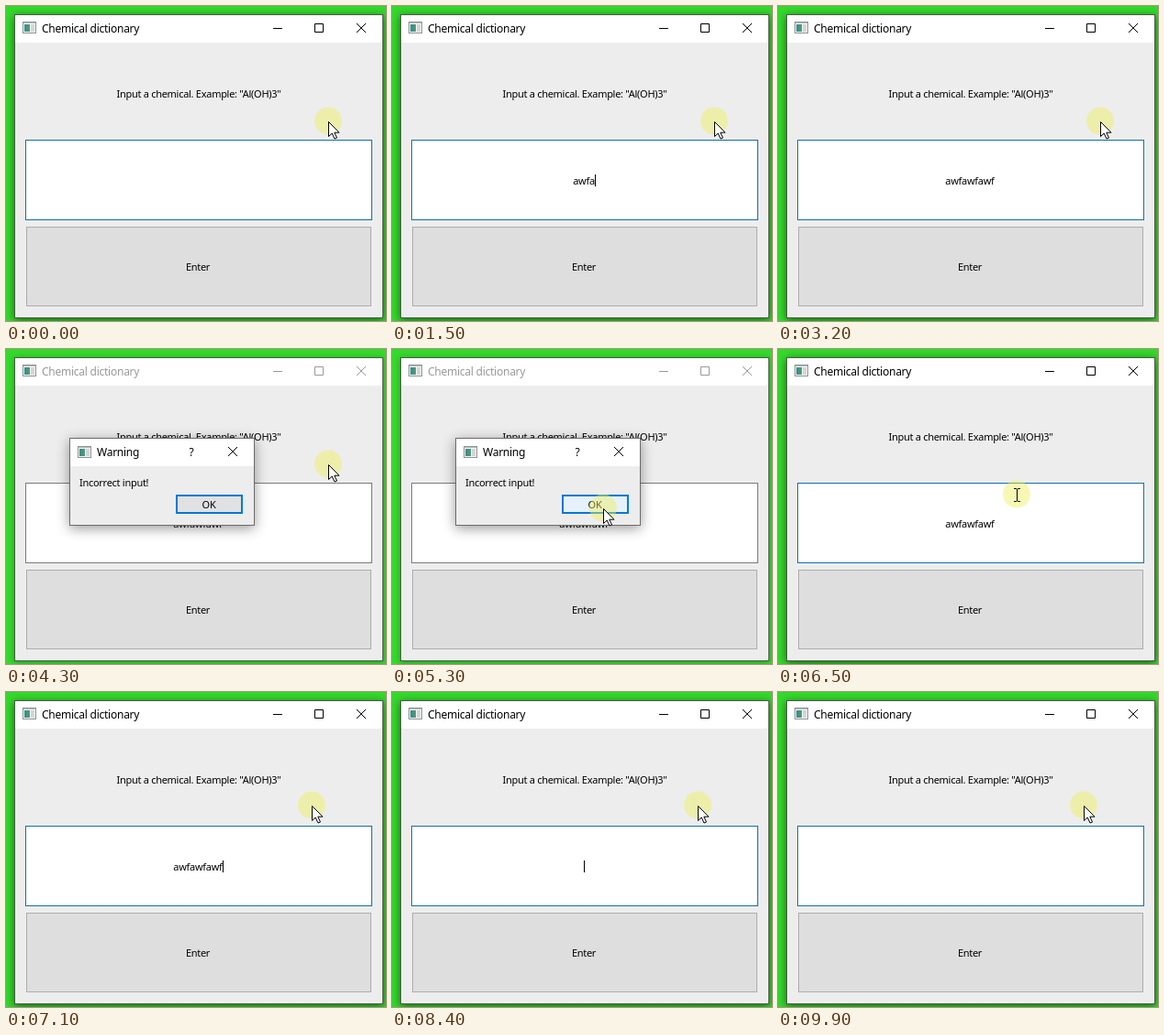
These frames come from a looping animation (414x344 px, 10000 ms). An HTML page:

```html
<!DOCTYPE html>
<html lang="en">
<head>
<meta charset="utf-8">
<title>Chemical dictionary</title>
<style>
  html, body { margin: 0; width: 100%; height: 100%; overflow: hidden; background: #35d92c; }
  svg { display: block; }
  text { font: 11px "Noto Sans", "Open Sans", sans-serif; letter-spacing: -.28px; fill: #000; white-space: pre; }
  .title { font-size: 12px; letter-spacing: -.25px; }
  .mid { text-anchor: middle; }
  .line { fill: none; stroke: currentColor; }
  #frame { filter: drop-shadow(0 2px 5px rgba(0, 0, 0, .55)); }
  #dialog { transform-origin: 170px 145px; }
  #dialogBox { filter: drop-shadow(0 3px 7px rgba(0, 0, 0, .4)); }
  .inactive #frame { filter: drop-shadow(0 1px 3px rgba(0, 0, 0, .3)); }
  .inactive #bar { color: #999; }
  .inactive #bar text { fill: #999; }
  #field { fill: #fff; stroke: #146ea8; }
  .inactive #field { stroke: #7a7a7a; }
  #ok { fill: #e1e1e1; stroke: #0078d7; stroke-width: 2; }
  #ok.hover { fill: #e5f1fb; }
</style>
</head>
<body>
<svg id="stage" width="414" height="344" viewBox="0 0 414 344">
  <defs>
    <linearGradient id="pane"><stop stop-color="#3c8c8c"/><stop offset="1" stop-color="#4d9c78"/></linearGradient>
    <g id="icon">
      <rect x=".5" y=".5" width="14" height="12" fill="#f4f4f4" stroke="#8c9296"/>
      <path d="M1 1.5H14" stroke="#b4bcc0"/>
      <rect x="2" y="3" width="6" height="8" fill="url(#pane)"/>
      <rect x="9" y="3" width="4" height="8" fill="#d2d6d8"/>
    </g>
  </defs>
  <rect width="414" height="344" fill="#35d92c"/>

  <g id="main">
    <rect id="frame" x="9.5" y="9.5" width="401" height="331" fill="#ededed" stroke="#4c5a4a"/>
    <rect x="10" y="10" width="400" height="30" fill="#fff"/>
    <g id="bar">
      <use href="#icon" x="18" y="17"/>
      <text class="title" x="39" y="29">Chemical dictionary</text>
      <path class="line" d="M291 24.5H301M336.5 19.5H345.5V28.5H336.5ZM382 19L392 29M392 19L382 29"/>
    </g>
    <text class="mid" x="210" y="100">Input a chemical. Example: "Al(OH)3"</text>
    <rect id="field" x="21.5" y="146.5" width="377" height="87"/>
    <text id="entry" class="mid" x="209" y="195"></text>
    <path id="caret" d="M.5 184V197" stroke="#000"/>
    <rect x="22.5" y="241.5" width="375" height="86" fill="#dedede" stroke="#adadad"/>
    <text class="mid" x="209" y="289">Enter</text>
  </g>

  <g id="dialog">
    <rect id="dialogBox" x="69.5" y="97.5" width="201" height="95" fill="#ededed" stroke="#6c6c6c"/>
    <rect x="70" y="98" width="200" height="30" fill="#fff"/>
    <use href="#icon" x="78" y="106"/>
    <text class="title" x="99" y="117">Warning</text>
    <text class="title mid" x="202" y="117" font-weight="600">?</text>
    <path class="line" d="M242 107L252 117M252 107L242 117"/>
    <text x="80" y="150">Incorrect input!</text>
    <rect id="ok" x="186" y="160" width="71" height="19"/>
    <text class="mid" x="221" y="174">OK</text>
  </g>

  <g id="mouse">
    <circle cy="-.5" r="15" fill="#f0f05a" fill-opacity=".45"/>
    <path id="arrow" d="M.5 .5V16.5L4.2 13L7 19L9.5 18L6.8 12.2H12Z" fill="#fff" stroke="#000"/>
    <path id="beam" class="line" d="M-3 -6.5H0M1 -6.5H4M-3 7.5H0M1 7.5H4M.5 -6V7"/>
  </g>
</svg>
<script>
  const LOOP = 10000, WORD = "awfawfawf", BLINK = 530;
  const typing = { start: 920, step: 180 };
  const erasing = { start: 7450, step: 70 };
  const OPEN = 3500, CLOSE = 5850, FADE = 200;
  const REST = [351, 126], OK = [226, 176], AWAY = [333, 124];

  const $ = id => document.getElementById(id);
  const clamp = v => Math.min(1, Math.max(0, v));
  const ease = v => v * v * (3 - 2 * v);
  const show = (id, on) => $(id).setAttribute("visibility", on ? "visible" : "hidden");
  const keysHit = (keys, t) => Math.min(WORD.length, Math.max(0, Math.floor((t - keys.start) / keys.step) + 1));
  const lastHit = (keys, t) => keys.start + (keysHit(keys, t) - 1) * keys.step;

  // The caret blink restarts with each key and when focus returns.
  function blinkStart(t) {
    if (t >= erasing.start) return lastHit(erasing, t);
    if (t >= CLOSE) return CLOSE;
    if (t >= typing.start) return lastHit(typing, t);
    return lastHit(erasing, LOOP) - LOOP;
  }

  function mouseAt(t) {
    const glide = (a, b, from, to) => {
      const k = ease(clamp((t - from) / (to - from)));
      return a.map((v, i) => v + (b[i] - v) * k);
    };
    return t < CLOSE ? glide(REST, OK, 4500, 5400) : glide(OK, AWAY, 6200, 7000);
  }

  function draw(t) {
    const modal = t >= OPEN && t < CLOSE;
    $("stage").classList.toggle("inactive", modal);

    $("entry").textContent = WORD.slice(0, keysHit(typing, t) - keysHit(erasing, t));
    const end = Math.round(209 + $("entry").getComputedTextLength() / 2);
    $("caret").setAttribute("transform", `translate(${end})`);
    show("caret", !modal && Math.floor((t - blinkStart(t)) / BLINK) % 2 === 0);

    const shown = t < CLOSE ? ease(clamp((t - OPEN) / FADE)) : 1 - clamp((t - CLOSE) / FADE);
    $("dialog").style.opacity = shown;
    $("dialog").style.transform = `scale(${1 - .035 * (1 - shown)})`;

    const [x, y] = mouseAt(t);
    $("mouse").setAttribute("transform", `translate(${Math.round(x)} ${Math.round(y)})`);
    $("ok").classList.toggle("hover", x > 185 && x < 258 && y > 159 && y < 180);
    const overField = !modal && y > 146 && y < 234;
    show("beam", overField);
    show("arrow", !overField);
  }

  function tick() {
    draw(performance.now() % LOOP);
    requestAnimationFrame(tick);
  }
  tick();
</script>
</body>
</html>
```
